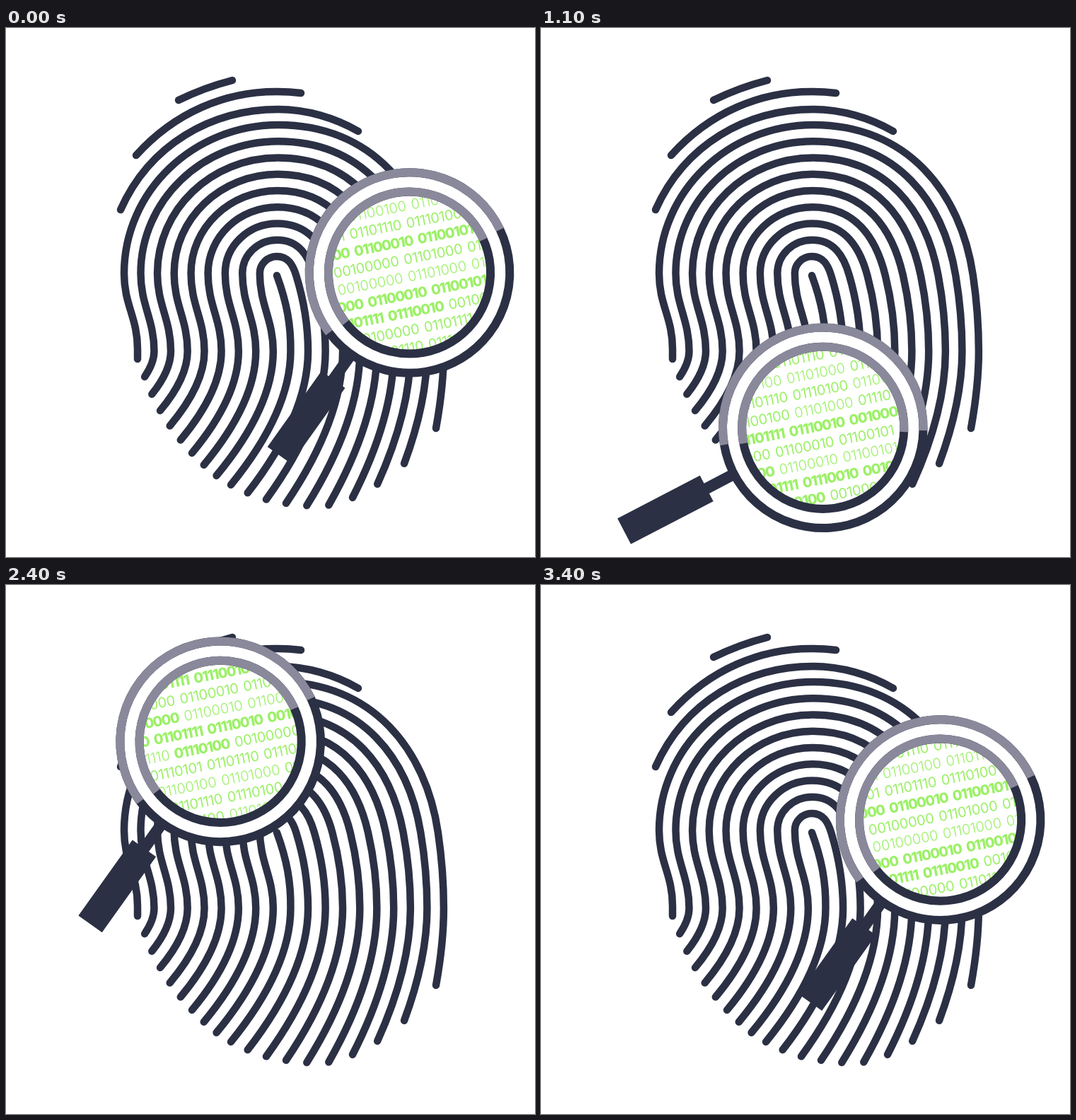
Recreate the animation shown at these times as an HTML page with a canvas. Size 748 px wide and 748 px high, loop 3500 ms.

```html
<!DOCTYPE html>
<html>
<head>
<meta charset="utf-8">
<style>
html, body { margin: 0; width: 100%; height: 100%; overflow: hidden; background: #fff; }
canvas { display: block; }
</style>
</head>
<body>
<canvas id="stage" width="748" height="748"></canvas>
<script>
const ctx = document.getElementById('stage').getContext('2d');
const DARK = '#2b3044', GREY = '#8a899b', GREEN = '#9cf067';
const LOOP = 3500, STEP = 100, RAD = Math.PI / 180;

// Point at u on a closed smooth curve; whole numbers hit the given points
function spline(points, u) {
  const n = points.length, i = Math.floor(u), s = u - i;
  const [a, b, c, d] = [-1, 0, 1, 2].map(k => points[(i + k + n) % n]);
  return [0, 1].map(k => {
    const m0 = (c[k] - a[k]) / 2, m1 = (d[k] - b[k]) / 2, gap = c[k] - b[k];
    return b[k] + s * (m0 + s * (3 * gap - 2 * m0 - m1 + s * (m0 + m1 - 2 * gap)));
  });
}

// The lens passes these points at equal intervals, one round in 3450 ms
const orbit = [[570.5, 346], [573, 494], [436, 571], [280, 494], [239, 338], [318, 212], [471, 225]];
const lensAt = t => spline(orbit, t / 3450 * orbit.length);

function handleAngle(t) {
  const rise = Math.min(t / 700, 1), fall = Math.min(Math.max((t - 1100) / 770, 0), 1);
  return (125.5 + 27 * (rise - fall)) * RAD;
}

// Fingerprint: 19 evenly spaced columns, joined in pairs by nine arches around a core.
// The lower rim names every third column's end; its last two points only steer the curve.
const rim = [[186, 468], [218, 541], [263, 601], [318, 646], [396, 672], [490, 664], [608, 566],
  [790, 280], [155, 390]];
const column = i => 186 + 24.05 * i - 1.7 * Math.sin(i * Math.PI / 9);

function tail(i) {
  const [x, y] = spline(rim, i / 3), w = column(i), top = Math.min(457, y - 14);
  return { up: `M${x} ${y}Q${w} ${top + (y - top) * .45} ${w} ${top}`, top };
}

function ridges() {
  let d = 'M244 102Q281 84 320 74M184 180C238 120 310 89 385 90Q401 90 417 92'
    + 'M162 257C203 165 290 115 385 115C425 115 465 127 498 146';
  for (let n = 0; n < 9; n++) {
    const y = 137 + 23.25 * n, cx = 385 - n / 4;
    const left = column(n), l = left - 19;
    const right = column(18 - n), lean = 8 + 1.1 * n, r = right - lean;
    const h = .55 * (350 - y), { up, top } = tail(n);
    d += up + `C${left} ${top - 45} ${l} 392 ${l} 347`
      + `C${l} ${347 - .552 * (347 - y)} ${cx - .552 * (cx - l)} ${y} ${cx} ${y}`
      + `C${cx + .59 * (r - cx)} ${y} ${r - h * lean / 55} ${350 - h} ${r} 350`
      + `C${r + lean * .7} 388 ${right} 420 ${right} 457` + tail(18 - n).up;
  }
  return new Path2D(d + tail(9).up + 'C403 420 397 388 383 350');
}
const print = ridges();

// Rows of bits, repeated down the wall: left edge, words (+ bold, - light)
const rows = [
  [58, '00100000 +01101111 +01110010 +00100000 +01100010 +01100101'],
  [23, '+01110100 00100000 01100010 01100101 00100000 01101000 01110101'],
  [24, '+01110100 +00100000 -01100010 -01100101 -00100000 -01101000 -01110101'],
  [63, '+00100000 +01101111 +01110010 +00100000 +01100010 +01100101'],
  [20, '01100101 -01101110 +01110100 00100000 +01101111 +01110010 00100000'],
  [57, '01101000 01110101 01101110 01110100 00100000 01101111 01110010'],
  [68, '+01100101 -01100100 -01101000 01110101 01101110 01110100 00100000'],
  [-5, '01100100 01110101 01101110 01110100 -01100101 -01100100 -01101110 01110101'],
  [70, '01100101 01100100 -01101000 01110101 01101110 01110100 00100000']
];
const advance = { '0': 12.35, '1': 7.55, ' ': 7 };

function drawBits() {
  ctx.save();
  ctx.rotate(-11 * RAD);
  ctx.fillStyle = GREEN;
  ctx.textAlign = 'center';
  for (let r = 0; r < 24; r++) {
    const [edge, text] = rows[r % rows.length], base = 187.5 + 24.85 * r;
    let pen = edge;
    for (const word of text.split(' ')) {
      const weight = { '+': 800, '-': 300 }[word[0]] || 400;
      ctx.font = `${weight} 20px Inter, Roboto, sans-serif`;
      for (const c of word.replace(/[+-]/, '') + ' ') {
        ctx.fillText(c, pen + advance[c] / 2, base);
        pen += advance[c];
      }
    }
  }
  ctx.restore();
}

function disc(x, y, r) {
  ctx.beginPath();
  ctx.arc(x, y, r, 0, 2 * Math.PI);
}

// Dark ring with a grey upper part
function ring(r) {
  const dip = Math.asin(14 / r);
  ctx.lineWidth = 12;
  ctx.strokeStyle = DARK;
  disc(0, 0, r);
  ctx.stroke();
  ctx.strokeStyle = GREY;
  ctx.beginPath();
  ctx.arc(0, 0, r, Math.PI - dip, 2 * Math.PI + dip);
  ctx.stroke();
}

function draw(t) {
  const [x, y] = lensAt(t), angle = handleAngle(t);
  ctx.fillStyle = '#fff';
  ctx.fillRect(0, 0, 748, 748);

  ctx.strokeStyle = DARK;
  ctx.lineWidth = 10.5;
  ctx.lineCap = ctx.lineJoin = 'round';
  ctx.stroke(print);
  ctx.lineCap = 'butt';

  ctx.save();
  ctx.translate(x, y);
  ctx.rotate(angle);
  ctx.fillStyle = DARK;
  ctx.fillRect(140, -8, 50, 16);
  ctx.fillRect(185.5, -20.5, 131.5, 41);
  ctx.restore();

  ctx.fillStyle = '#fff';
  disc(x, y, 145);
  ctx.fill();

  ctx.save();
  disc(x, y, 110);
  ctx.clip();
  drawBits();
  ctx.restore();

  ctx.save();
  ctx.translate(x, y);
  ctx.rotate(angle - 156.6 * RAD);
  ring(141.8);
  ring(114.6);
  ctx.restore();
}

const start = performance.now();
let shown = -1;
function tick() {
  const t = Math.floor((performance.now() - start) % LOOP / STEP) * STEP;
  if (t !== shown) draw(shown = t);
  requestAnimationFrame(tick);
}
tick();
</script>
</body>
</html>
```
